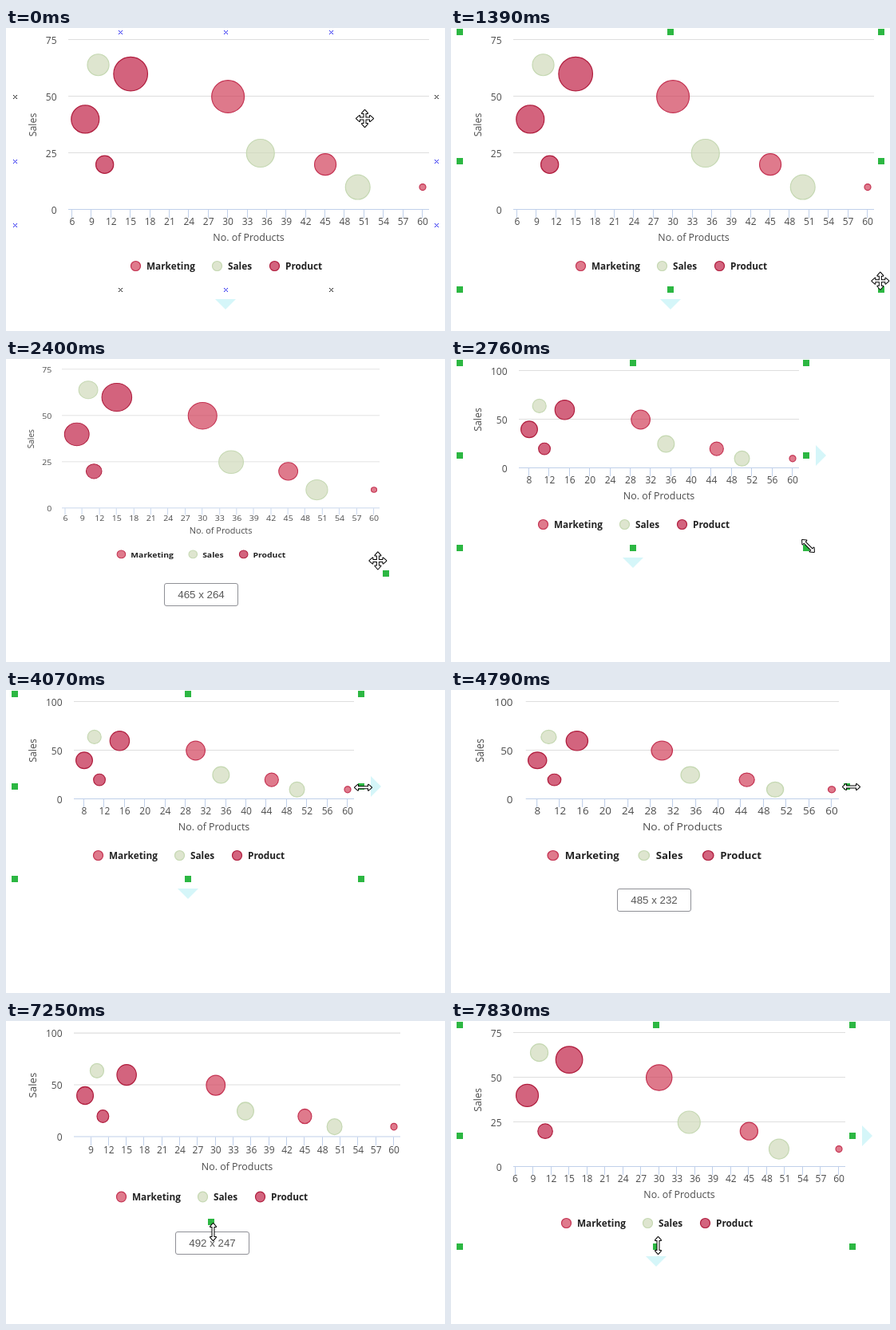
An HTML page with a canvas that plays this animation: 550x380 px, repeating every 9830 ms.

```html
<!DOCTYPE html>
<html lang="en">
<head>
<meta charset="utf-8">
<title>Resizing a bubble chart</title>
<style>
  html, body { margin: 0; width: 100%; height: 100%; overflow: hidden; background: #fff; }
  canvas { display: block; }
</style>
</head>
<body>
<canvas id="stage" width="550" height="380"></canvas>
<script>
const ctx = document.getElementById('stage').getContext('2d');
const LOOP = 9830, STEP = 70;
const LEFT = 11, TOP = 5, PLOT_TOP = 15;
const FONT = '"Open Sans", "Noto Sans", sans-serif';

// Points are [x, y, relative size].
const series = [
  { name: 'Marketing', fill: '#d1415b', line: '#c43352', dot: -112.5, label: -99,
    points: [[30, 50, .95], [45, 20, .55], [60, 10, 0]] },
  { name: 'Sales', fill: '#d0daba', line: '#c5d8b2', dot: -10.5, label: 3,
    points: [[10, 64, .55], [35, 25, .78], [50, 10, .66]] },
  { name: 'Product', fill: '#c02247', line: '#b01e3e', dot: 61.5, label: 75,
    points: [[8, 40, .78], [11, 20, .41], [15, 60, 1]] }
];

// Each layout is what the chart looks like after a resize is released.
const layouts = [
  { at: 0, w: 528, h: 323, left: 78, first: 6, firstX: 83, step: 3, yMax: 75, yStep: 25 },
  { at: 2760, w: 434, h: 232, left: 85, first: 8, firstX: 98, step: 4, yMax: 100, yStep: 50 },
  { at: 5000, w: 492, h: 232, left: 85, first: 9, firstX: 106.5, step: 3, yMax: 100, yStep: 50 },
  { at: 7830, w: 492, h: 278, left: 78, first: 6, firstX: 80.5, step: 3, yMax: 75, yStep: 25 }
];

// Legs are [start, end, target a, target b, eased].
const sizeLegs = [
  [0, 0, 528, 323],
  [1980, 1980, 526, 321], [2050, 2190, 496, 296], [2260, 2610, 434, 232],
  [4440, 4790, 485, 232], [4860, 4930, 492, 232],
  [7110, 7250, 492, 247], [7320, 7530, 492, 278]
];
const pointerLegs = [
  [0, 0, 449.5, 113.5], [750, 750, 450, 117],
  [900, 1530, 541.5, 325.5, true],
  [1910, 2190, 493.5, 280.5], [2260, 2540, 447.5, 234.5],
  [3370, 4140, 447.5, 121.5, true],
  [4440, 4790, 501.5, 121.5], [4860, 4930, 505.5, 121.5],
  [5690, 6180, 318.5, 212.5], [6250, 6670, 259.5, 235.5, true],
  [7110, 7250, 259.5, 264.5], [7320, 7460, 259.5, 281.5]
];

// Arrow angles per pointer shape.
const MOVE = [0, 90], NWSE = [-45], EW = [90], NS = [0];
const pointerShapes = [
  { at: 0, angles: MOVE }, { at: 1460, angles: NWSE }, { at: 1980, angles: MOVE },
  { at: 2540, angles: NWSE }, { at: 3440, angles: MOVE }, { at: 4070, angles: EW },
  { at: 5760, angles: MOVE }, { at: 6600, angles: NS }
];

// The active handle sits at (hx, hy) as fractions of the chart box.
const drags = [
  { press: 1910, move: 1980, release: 2760, hx: 1, hy: 1 },
  { press: 4210, move: 4440, release: 5000, hx: 1, hy: .5 },
  { press: 6740, move: 7110, release: 7830, hx: .5, hy: 1 }
];

const latest = (list, t) => list.filter(item => item.at <= t).pop();
const crisp = v => Math.round(v) - .5;

function follow(legs, t) {
  let a = 0, b = 0;
  for (const [start, end, toA, toB, eased] of legs) {
    if (t < start) break;
    const steps = (end - start) / STEP + 1;
    let p = Math.min(1, (Math.floor((t - start) / STEP) + 1) / steps);
    if (eased) p = 1 - (1 - p) ** 2;
    a += (toA - a) * p;
    b += (toB - b) * p;
  }
  return [a, b];
}

function text(str, x, y, align, font, color) {
  ctx.font = font;
  ctx.textAlign = align;
  ctx.fillStyle = color;
  ctx.fillText(str, x, y);
}

function line(x1, y1, x2, y2, color) {
  ctx.strokeStyle = color;
  ctx.lineWidth = 1;
  ctx.beginPath();
  ctx.moveTo(x1, y1);
  ctx.lineTo(x2, y2);
  ctx.stroke();
}

function polygon(points, color) {
  ctx.fillStyle = color;
  ctx.beginPath();
  points.forEach(([x, y]) => ctx.lineTo(x, y));
  ctx.fill();
}

function bubble(x, y, r, { fill, line: edge }) {
  ctx.beginPath();
  ctx.arc(x, y, r, 0, 2 * Math.PI);
  ctx.globalAlpha = .7;
  ctx.fillStyle = fill;
  ctx.fill();
  ctx.globalAlpha = 1;
  ctx.strokeStyle = edge;
  ctx.lineWidth = 1.2;
  ctx.stroke();
}

function drawChart(c) {
  const right = LEFT + c.w - 9, base = c.h - 95, middle = (c.left + right) / 2;
  const perX = (right - 8 - c.firstX) / (60 - c.first);
  const perY = (base - PLOT_TOP) / c.yMax;
  const px = x => c.firstX + (x - c.first) * perX;
  const py = y => base - y * perY;
  const tickFont = '500 12px ' + FONT, titleFont = '500 12.4px ' + FONT;
  const axisColor = '#c0d0ea', gridColor = '#dedede', textColor = '#4c4c4c';

  for (let y = 0; y <= c.yMax; y += c.yStep) {
    const gy = crisp(py(y));
    line(c.left, gy, right, gy, y ? gridColor : axisColor);
    text(y, c.left - 14.5, gy + 5, 'right', tickFont, textColor);
  }
  for (let x = c.first; x <= 60; x += c.step) {
    const tx = crisp(px(x));
    line(tx, base, tx, base + 10, axisColor);
    text(x, px(x), base + 19, 'center', tickFont, textColor);
  }
  text('No. of Products', middle, base + 38.5, 'center', titleFont, textColor);

  ctx.save();
  ctx.translate(38, (PLOT_TOP + base) / 2);
  ctx.rotate(-Math.PI / 2);
  text('Sales', 0, 0, 'center', titleFont, textColor);
  ctx.restore();

  const maxRadius = (base - PLOT_TOP) / 10;
  const center = LEFT + c.w / 2;
  for (const s of series) {
    for (const [x, y, size] of s.points) bubble(px(x), py(y), 4 + size * (maxRadius - 4), s);
    bubble(center + s.dot, base + 70.5, 6, s);
    text(s.name, center + s.label, base + 75, 'left', 'bold 11.8px ' + FONT, '#222');
  }
}

function drawHandle(w, h, hx, hy) {
  ctx.fillStyle = '#2cb742';
  ctx.fillRect(Math.round(LEFT + w * hx) - 4, Math.round(TOP + h * hy) - 4, 8, 8);
}

function drawHandles(w, h) {
  for (const hx of [0, .5, 1])
    for (const hy of [0, .5, 1])
      if (hx !== .5 || hy !== .5) drawHandle(w, h, hx, hy);
}

function drawCross(x, y, color) {
  line(x - 2, y - 2, x + 3, y + 3, color);
  line(x + 3, y - 2, x - 2, y + 3, color);
}

function drawAnchors(w, h) {
  const blue = '#2a2af0', black = '#222';
  [.25, .5, .75].forEach((f, i) => {
    const x = Math.round(LEFT + w * f), y = Math.round(TOP + h * f);
    drawCross(x, TOP, blue);
    drawCross(x, TOP + h, i === 1 ? blue : black);
    drawCross(LEFT, y, i ? blue : black);
    drawCross(LEFT + w, y, i ? blue : black);
  });
}

function drawTriangles(w, h) {
  const cx = LEFT + w / 2, cy = TOP + h / 2;
  const below = TOP + h + 12, beside = LEFT + w + 12, color = '#d5f6f9';
  polygon([[cx - 13, below], [cx + 13, below], [cx, below + 13]], color);
  polygon([[beside, cy - 13], [beside, cy + 13], [beside + 13, cy]], color);
}

function drawSizeTip(w, h) {
  const x = LEFT + Math.floor(w / 2) - 45, y = TOP + h + 12;
  ctx.beginPath();
  ctx.roundRect(x + .5, y + .5, 92, 28, 2.5);
  ctx.fillStyle = '#fff';
  ctx.fill();
  ctx.strokeStyle = '#8f9096';
  ctx.lineWidth = 1;
  ctx.stroke();
  text(`${w} x ${h}`, x + 46.5, y + 19, 'center',
    '13.33px "Liberation Sans", Arial, sans-serif', '#585858');
}

const arrow = new Path2D('M0-10.5L3.5-6.5H1V6.5H3.5L0 10.5L-3.5 6.5H-1V-6.5H-3.5Z');

function drawPointer(x, y, angles) {
  const eachArrow = paint => angles.forEach(angle => {
    ctx.save();
    ctx.translate(x, y);
    ctx.rotate(angle * Math.PI / 180);
    paint();
    ctx.restore();
  });
  ctx.strokeStyle = '#000';
  ctx.lineWidth = 2;
  ctx.lineJoin = 'round';
  ctx.fillStyle = '#fff';
  eachArrow(() => ctx.stroke(arrow));
  eachArrow(() => ctx.fill(arrow));
}

function draw(t) {
  const [w, h] = follow(sizeLegs, t).map(Math.round);
  const layout = latest(layouts, t);
  const drag = drags.find(d => t >= d.press && t < d.release);

  ctx.fillStyle = '#fff';
  ctx.fillRect(0, 0, 550, 380);

  ctx.save();
  ctx.translate(LEFT, TOP);
  ctx.scale(w / layout.w, h / layout.h);
  ctx.translate(-LEFT, -TOP);
  drawChart(layout);
  ctx.restore();

  if (drag) {
    drawHandle(w, h, drag.hx, drag.hy);
    if (t >= drag.move) drawSizeTip(w, h);
  } else {
    if (t < 300) drawAnchors(w, h);
    else drawHandles(w, h);
    if (t < 300 || t >= 600) drawTriangles(w, h);
  }
  drawPointer(...follow(pointerLegs, t), latest(pointerShapes, t).angles);
}

const origin = performance.now();
function tick() {
  draw((performance.now() - origin) % LOOP);
  requestAnimationFrame(tick);
}
tick();
</script>
</body>
</html>
```
